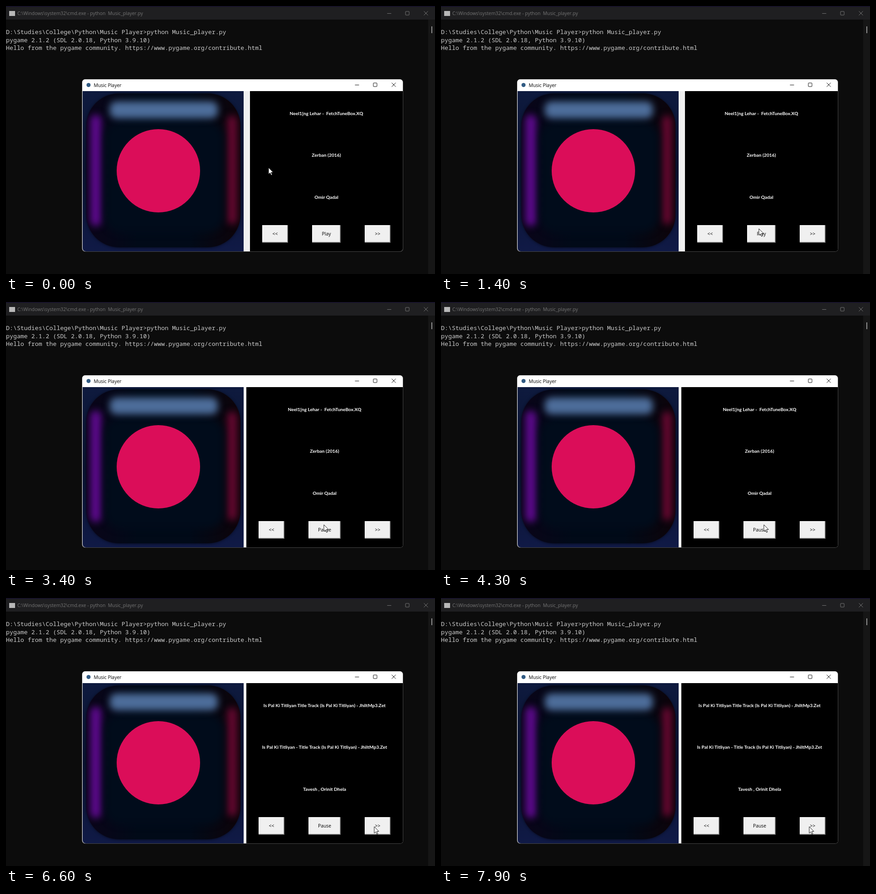
An HTML page with a canvas for the animation above (8 s loop, 946 by 592 pixels).

```html
<!DOCTYPE html>
<html lang="en">
<head>
<meta charset="utf-8">
<title>Music Player</title>
<style>
html, body { margin: 0; width: 100%; height: 100%; overflow: hidden; background: #0c0c0c; }
canvas, svg { position: absolute; left: 0; top: 0; width: 946px; height: 592px; }
text { white-space: pre; }
.ui { font: 10.4px "Open Sans", "Noto Sans", sans-serif; fill: #000; }
.bar { fill: #757575; }
.mono { font: 13.27px "Noto Sans Mono", "DejaVu Sans Mono", monospace; fill: #ccc; }
.tag { font: 700 10.3px Lato, "Liberation Sans", sans-serif; fill: #fff; }
.mid { text-anchor: middle; }
</style>
</head>
<body>
<canvas id="stage" width="946" height="592"></canvas>
<svg id="layer" viewBox="0 0 946 592"></svg>
<script>
const LOOP = 8000, PAUSE_AT = 1800, NEXT_AT = 6100;
const ctx = document.getElementById('stage').getContext('2d');
const layer = document.getElementById('layer');

const songs = [
  ['Neel1[ng Lehar -  FetchTuneBox.XQ', 'Zerban (2016)', 'Omir Qadal'],
  ['Is Pal Ki Titliyan Title Track (Is Pal Ki Titliyan) - JhiltMp3.Zet',
   'Is Pal Ki Titliyan - Title Track (Is Pal Ki Titliyan) - JhiltMp3.Zet',
   'Tavesh , Orinit Dhela']
];

// Pointer stops: time, x, y
const stops = [[0, 579, 357], [300, 579, 357], [1200, 701, 492], [3400, 701, 492],
  [3900, 712, 492], [4500, 712, 492], [5300, 812, 505], [LOOP, 812, 505]];

function node(tag, attrs) {
  const el = document.createElementNS('http://www.w3.org/2000/svg', tag);
  for (const k in attrs) el.setAttribute(k, attrs[k]);
  return layer.appendChild(el);
}

function label(cls, x, y, str = '') {
  const el = node('text', { class: cls, x, y });
  el.textContent = str;
  return el;
}

function rect(x, y, w, h, fill) {
  ctx.fillStyle = fill;
  ctx.fillRect(x, y, w, h);
}

function round(x, y, w, h, r, fill) {
  ctx.beginPath();
  ctx.roundRect(x, y, w, h, r);
  ctx.fillStyle = fill;
  ctx.fill();
}

function glow(x, y, w, h, r, blur, fill) {
  ctx.filter = `blur(${blur}px)`;
  round(x, y, w, h, r, fill);
  ctx.filter = 'none';
}

function gradient(x0, y0, x1, y1, ...colors) {
  const g = ctx.createLinearGradient(x0, y0, x1, y1);
  colors.forEach((c, i) => g.addColorStop(i / (colors.length - 1), c));
  return g;
}

// Minimize, maximize and close signs centred on three columns
function controls(xs, y, color) {
  const [a, b, c] = xs;
  ctx.strokeStyle = color;
  ctx.lineWidth = 1;
  ctx.beginPath();
  ctx.moveTo(a - 4.5, y + .5);
  ctx.lineTo(a + 4.5, y + .5);
  ctx.moveTo(c - 4.5, y - 4.5);
  ctx.lineTo(c + 4.5, y + 4.5);
  ctx.moveTo(c + 4.5, y - 4.5);
  ctx.lineTo(c - 4.5, y + 4.5);
  ctx.roundRect(b - 4, y - 4, 8, 8, 1);
  ctx.stroke();
}

function drawConsole() {
  rect(0, 0, 946, 592, '#0c0c0c');
  rect(0, 0, 946, 30, '#1f1f21');
  rect(0, 0, 946, 2, '#17122a');
  rect(931, 30, 15, 562, '#161616');
  rect(938, 45, 2, 15, '#929292');
  rect(7, 11, 13, 11, '#b8b8b8');
  controls([845, 885, 926], 16, '#777');
}

function drawCover() {
  ctx.save();
  ctx.beginPath();
  ctx.roundRect(169, 188, 355, 354, [0, 0, 0, 7]);
  ctx.clip();
  rect(169, 188, 355, 354, gradient(0, 188, 0, 542, '#0e1a3e', '#0a1230', '#101a46'));
  glow(178, 194, 338, 339, 72, 3, '#03050f');
  ctx.beginPath();
  ctx.roundRect(177, 193, 340, 340, 72);
  ctx.clip();
  rect(177, 193, 340, 340, gradient(177, 0, 517, 0, '#0a0418', '#010a18', '#010a18', '#0d0309'));
  glow(186, 240, 24, 246, 12, 8, '#5c0a8c');
  glow(488, 242, 21, 240, 10, 8, '#660830');
  glow(218, 256, 262, 244, 36, 8, '#010c1b');
  glow(229, 211, 238, 37, 14, 8, '#4d6d9a');
  ctx.restore();
  ctx.beginPath();
  ctx.arc(336, 364, 92, 0, 7);
  ctx.fillStyle = '#db0d59';
  ctx.fill();
}

function drawWindow() {
  round(167.5, 161.5, 708.5, 381.5, 7, '#484848');
  round(168, 162, 707, 380, 7, '#f0f0f0');
  round(168, 162, 707, 26, [7, 7, 0, 0], '#fff');
  ctx.beginPath();
  ctx.arc(182, 174.5, 4.5, 0, 7);
  ctx.fillStyle = '#315b83';
  ctx.fill();
  controls([774, 814, 855], 174, '#111');
  drawCover();
}

function button(x0, x1) {
  const w = x1 - x0;
  rect(x0, 484, w, 39, '#696969');
  rect(x0, 484, w - 1, 38, '#a0a0a0');
  rect(x0, 484, w - 2, 37, '#fff');
  rect(x0 + 1, 485, w - 3, 36, '#f0f0f0');
}

function drawPanel(left) {
  rect(524, 188, 15, 354, '#f0f0f0');
  round(left, 188, 875 - left, 354, [0, 0, 7, 0], '#000');
  button(left + 27, left + 84);
  button(left + 137, 738);
  button(791, 848);
}

function pointerAt(t) {
  const i = stops.findIndex(s => s[0] > t);
  const [t0, x0, y0] = stops[i - 1], [t1, x1, y1] = stops[i];
  const p = (t - t0) / (t1 - t0), e = p * p * (3 - 2 * p);
  return [x0 + (x1 - x0) * e, y0 + (y1 - y0) * e];
}

drawConsole();
drawWindow();
label('ui bar', 25, 20, 'C:\\Windows\\system32\\cmd.exe - python  Music_player.py');
label('mono', 0, 62, 'D:\\Studies\\College\\Python\\Music Player>python Music_player.py');
label('mono', 0, 79.5, 'pygame 2.1.2 (SDL 2.0.18, Python 3.9.10)');
label('mono', 0, 97, 'Hello from the pygame community. https://www.pygame.org/contribute.html');
label('ui', 193.5, 178.5, 'Music Player');
const tags = [240.5, 333, 426].map(y => label('tag mid', 0, y));
const prev = label('ui mid', 0, 507, '<<');
const play = label('ui mid', 0, 507);
label('ui mid', 819.5, 507, '>>');
const pointer = node('path', {
  d: 'M0 0V14.5L3.4 11.4L5.8 17L8 16L5.7 10.6H10.2Z',
  fill: '#fff', stroke: '#000', 'stroke-width': .9
});

function frame(now) {
  const t = now % LOOP;
  const playing = t >= PAUSE_AT;
  const left = playing ? 530 : 538;
  const mid = (left + 875) / 2;
  drawPanel(left);
  songs[t < NEXT_AT ? 0 : 1].forEach((s, i) => {
    tags[i].textContent = s;
    tags[i].setAttribute('x', mid);
  });
  prev.setAttribute('x', left + 55.5);
  play.setAttribute('x', mid);
  play.textContent = playing ? 'Pause' : 'Play';
  pointer.setAttribute('transform', `translate(${pointerAt(t)})`);
  requestAnimationFrame(frame);
}
frame(0);
</script>
</body>
</html>
```
